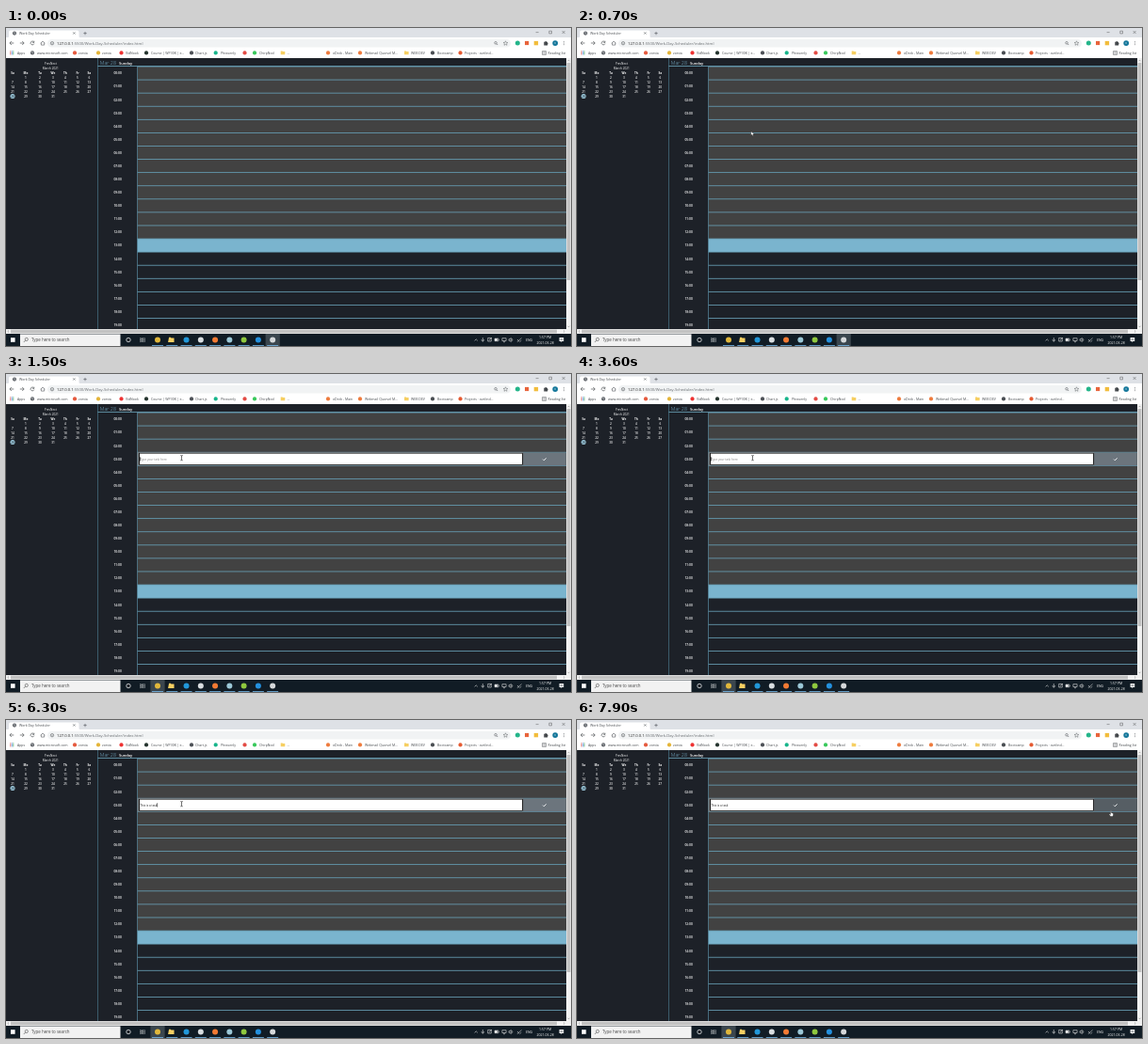
An HTML page for the animation above (8000 ms loop, 600 px wide and 338 px high).

```html
<!DOCTYPE html>
<html lang="en">
<head>
<meta charset="utf-8">
<title>Work Day Scheduler</title>
<style>
html, body { margin: 0; width: 100%; height: 100%; overflow: hidden; background: #1d2128; }
svg { display: block; width: 600px; height: 338px; }
text { font-family: "Open Sans", "Noto Sans", sans-serif; white-space: pre; }
</style>
</head>
<body>
<svg id="stage" viewBox="0 0 600 338"></svg>
<script>
const LOOP = 8000, ROW = 14.08, TOP = 41;
const BLUE = '#7ab4ce', LINE = '#6ba4bb', DARK = '#1d2128', INK = '#45494d';

const rect = (x, y, w, h, fill, extra = '') =>
  `<rect x="${x}" y="${y}" width="${w}" height="${h}" fill="${fill}" ${extra}/>`;
const dot = (x, y, r, fill, extra = '') =>
  `<circle cx="${x}" cy="${y}" r="${r}" fill="${fill}" ${extra}/>`;
const path = (d, stroke, width = 0.6, fill = 'none', extra = '') =>
  `<path d="${d}" stroke="${stroke}" stroke-width="${width}" fill="${fill}" ${extra}/>`;
const text = (x, y, str, size, fill, extra = '') =>
  `<text x="${x}" y="${y}" font-size="${size}" fill="${fill}" ${extra}>${str}</text>`;
const mid = (x, y, str, size, fill, extra = '') =>
  text(x, y, str, size, fill, `text-anchor="middle" ${extra}`);
const globe = (x, y) => dot(x, y, 2.1, '#5a5e63') +
  path(`M${x - 1.5} ${y - 0.6}h1.5l0.5 1.6M${x + 0.5} ${y - 1.3}l1 0.9`, '#dfe2e5', 0.5);
const folder = (x, y, s = 1) =>
  path(`M${x - 2.3 * s} ${y - 1.9 * s}h1.8l0.6 0.6h${2.2 * s}v${3.2 * s}h${-4.6 * s}z`, 'none', 0, '#f6cf62');

function browser() {
  let s = rect(0, 0, 600, 11, '#dee1e6') + rect(0, 10, 600, 22, '#fff') +
    path('M1.5 11Q3 10.5 3 8.5V4.5Q3 2.5 5 2.5H75.5Q77.5 2.5 77.5 4.5V8.5Q77.5 10.5 79 11z', 'none', 0, '#fff') +
    globe(9, 5.6) + text(14, 6.9, 'Work Day Scheduler', 3.5, INK) +
    path('M71.2 4.4l2.2 2.2m0 -2.2l-2.2 2.2M84 3.9v3.4m-1.7 -1.7h3.4', INK, 0.55) +
    path('M562.6 4.6h3M576.8 3.2h2.7v2.7h-2.7zM590.6 3l3 3m0 -3l-3 3', '#333', 0.4);

  s += path('M8.3 16h-4.3m1.9 -2l-2 2l2 2', INK, 0.65) +
    path('M14.8 16h4.3m-1.9 -2l2 2l-2 2', INK, 0.65) +
    path('M29.5 14.8a1.9 1.9 0 1 0 .3 1.8M29.8 13.7v1.7h-1.7', INK, 0.65) +
    path('M36.7 16.2l2.3 -2.1l2.3 2.1M37.4 15.8v2.3h3.2v-2.3', INK, 0.55) +
    rect(44, 11.9, 492, 8.6, '#f1f3f4', 'rx="4.3"') +
    dot(49, 16.2, 1.7, 'none', `stroke="${INK}" stroke-width=".5"`) +
    path('M49 15.1v.5m0 .4v1.4', INK, 0.5) +
    text(54, 17.8, '127.0.0.1<tspan fill="#666a6e">:5500/Work-Day-Scheduler/index.html</tspan>', 4.17, '#222') +
    dot(520, 15.8, 1.3, 'none', `stroke="${INK}" stroke-width=".5"`) + path('M521 16.8l1.2 1.2', INK) +
    path('M530.5 13.8l.7 1.6 1.7.1-1.3 1.1.4 1.7-1.5-.9-1.5.9.4-1.7-1.3-1.1 1.7-.1z', INK, 0.4) +
    dot(543.3, 16, 2.5, '#24b58a') + rect(551, 13.9, 4.2, 4.2, '#e8643c') +
    rect(560.7, 13.9, 4.4, 4.4, '#f2bd3d') +
    path('M571.3 14.8h1.1a.8 .8 0 0 1 1.6 0h1.1v1.2a.8 .8 0 0 1 0 1.5v1.1h-3.8z', 'none', 0, '#44484c') +
    dot(583.2, 16.1, 2.9, '#16789b') + mid(583.2, 17.3, 'v', 3.3, '#fff') +
    [14.3, 16, 17.7].map(y => dot(592.6, y, 0.45, INK)).join('');

  // Bookmarks: icon x, icon colour, label x, label
  const marks = [
    [73, '#e5593d', 77, 'zorvia'], [98, '#e4b437', 102, 'zorvia'], [122.5, '#e33', 127, 'VidNook'],
    [149, '#24332d', 154, 'Course | WP30K | e...'], [197, '#4c5056', 201, 'Chart.js'],
    [222.7, '#19b58b', 228, 'Phrasenly'], [253.5, '#e34c45', 0, ''], [264, '#37c85a', 269, 'ChirpNod'],
    [342, '#ee7b3d', 347, 'oDeck - Main'], [376, '#ee7b3d', 381, 'Webmail Quorvel M...'],
    [453, '#494d52', 458, 'Bootcamp'], [482.5, '#e55b32', 487, 'Projects · ovelind...']
  ];
  for (const [ix, color, x, label] of marks)
    s += dot(ix, 26.4, 2.1, color) + text(x, 27.7, label, 3.5, INK);
  for (let i = 0; i < 9; i++)
    s += rect(4.3 + i % 3 * 1.5, 24.4 + (i / 3 | 0) * 1.5, 1, 1, ['#db4a3f', '#4c8bea', '#42a564'][i % 3]);
  return s + text(12, 27.7, 'Apps', 3.5, INK) + globe(28, 26.4) + text(33, 27.7, 'www.microsoft.com', 3.5, INK) +
    folder(294, 26.4) + text(298.5, 27.7, '...', 3.5, INK) +
    folder(425.3, 26.4) + text(430, 27.7, 'WEB DEV', 3.5, INK) +
    path('M569.5 24.6h4v3.8h-4zM570.5 25.8h2m-2 1.3h2', INK, 0.5) + text(575.6, 27.7, 'Reading list', 3.5, INK);
}

function calendar() {
  const cols = [7, 21, 36, 50, 63, 76, 88.3];
  let s = mid(47.3, 39.2, 'PrevNext', 3.1, '#eee') + mid(47.3, 44, 'March 2021', 3.1, '#fff');
  'Su Mo Tu We Th Fr Sa'.split(' ').forEach((d, i) => s += mid(cols[i], 49, d, 3.1, '#fff', 'font-weight="700"'));
  s += dot(7, 72.4, 2.5, '#a5d4e8');
  for (let d = 1; d <= 31; d++)
    s += mid(cols[d % 7], 53.6 + (d / 7 | 0) * 5, d, 3.1, d == 28 ? '#26333c' : '#f0f0f0', 'font-weight="600"');
  return s;
}

function page() {
  let s = rect(0, 32, 600, 288, DARK) + calendar() +
    text(99.8, 38.6, 'Mar 28', 5.4, BLUE, 'font-weight="300"') +
    text(120, 38.6, 'Sunday', 4, '#fff', 'font-weight="600"');
  for (let h = 0; h < 20; h++) {
    const y = TOP + h * ROW;
    s += rect(139.5, y, 455.5, ROW, h < 13 ? '#424242' : h == 13 ? BLUE : DARK) +
      rect(139.5, y - 0.4, 455.5, 0.8, LINE) +
      mid(118.6, y + 8.4, String(h).padStart(2, 0) + ':00', 3.3, '#fff', 'font-weight="600"');
  }
  return s + rect(97, 40.2, 498, 0.8, LINE) + rect(97, 32, 0.7, 288, '#4b7689') + rect(139, TOP, 0.7, 279, '#5b8da3') +
    rect(595, 32, 5, 293, '#f1f1f1') + rect(595.6, 37, 3.8, 231, '#c1c1c1') +
    rect(0, 320, 600, 5, '#f1f1f1') + rect(5, 320.6, 580, 3.8, '#c1c1c1') +
    path('M596.4 35.3l1.1 -1.2l1.1 1.2M596.4 316.7l1.1 1.2l1.1 -1.2M3 321.4l-1.2 1.1l1.2 1.1M592 321.4l1.2 1.1l-1.2 1.1', '#777', 0.5);
}

function taskbar() {
  const apps = ['#e0b73b', '#f4cd63', '#2197d8', '#d8dde0', '#f27a33', '#9bc7d6', '#8fc83e', '#2490dd', '#d5d8da'];
  let s = rect(0, 325, 600, 13, '#111c25') + rect(5, 329.2, 4.6, 4.6, '#fff') +
    rect(15, 325.4, 106.5, 12.6, '#f2f2f2') +
    dot(21.8, 330.9, 1.6, 'none', 'stroke="#333" stroke-width=".5"') + path('M20.6 332.1l-1.7 1.8', '#333') +
    text(27, 333.2, 'Type here to search', 4.45, '#484848') +
    dot(130, 331.5, 2.2, 'none', 'stroke="#fff" stroke-width=".7"') +
    path('M142.6 329.3v.7h3.4v-.7M142.6 333.9v-.7h3.4v.7M142.6 330.9h3.4v1.3h-3.4zM147.3 329.3v4.6', '#e6e8ea', 0.5) +
    rect(153.4, 325, 15.2, 13, '#3b464e', 'id="chromeOn"') + rect(275.6, 325, 15.2, 13, '#3b464e', 'id="recOn"');
  apps.forEach((c, i) => {
    const x = 161 + i * 15.27;
    s += (i == 1 ? folder(x, 331.5, 1.4) : dot(x, 331.5, 3, c)) +
      rect(x - 6, 337.2, 12, 0.8, '#76b9ed');
  });
  const tray = 'M497.6 332.4l1.6 -1.6l1.6 1.6M506.3 329v2.8m-1.2 -.6v1h2.4v-1m-1.2 1v1.5' +
    'M511.7 329.4h3.6v3.6h-3.6zM512.8 331.9l3.2 -2.8M519 330.1h4v2.6h-4zM523.2 331v.8' +
    'M526.9 329.7h4.2v2.8h-4.2zM528 333.7h2M534 330.7h1l1.3 -1.2v4l-1.3 -1.2h-1zM537.3 330.2q1 1.3 0 2.6' +
    'M543 333.8l4.4 -4.4M543 331l2 2.3M545.6 333.6l1.7 -1.6';
  return s + path(tray, '#f0f0f0', 0.55) + rect(519, 330.1, 2.8, 2.6, '#f0f0f0') +
    text(552, 332.9, 'ENG', 3.5, '#fff') +
    mid(572.6, 329.9, '1:57 PM', 3.5, '#fff') + mid(572.6, 336, '2021-03-28', 3.5, '#fff') +
    path('M587.6 329h4.6v4h-1.8l-1 1.2v-1.2h-1.8z', 'none', 0, '#fff') +
    path('M588.5 330.4h2.8m-2.8 1.2h2.8', '#111c25', 0.4);
}

const form = `<g id="form">${
  rect(139.5, 83.2, 410, 14.2, '#777b7e') + rect(141, 84, 407.8, 12.6, '#1b1b1b') + rect(142, 84.6, 406, 11.4, '#fff') +
  rect(549.4, 83.6, 45.4, 13.6, '#6c757d', 'id="save"') + path('M570.1 90.6l1.2 1.2l2.3 -2.4', '#fff', 0.9) +
  text(142.3, 91.6, '', 3.1, '#333', 'id="entry"') + rect(0, 88.3, 0.6, 4.2, '#111', 'id="caret"')}</g>`;

const pointers =
  path('M0 0v4.6l1.1 -1l.8 1.7l.8 -.4l-.8 -1.6h1.5z', '#111', 0.35, '#fff', 'id="arrow"') +
  path('M-1.2 -2.6h.9l.3 .3l.3 -.3h.9M0 -2.3v4.6M-1.2 2.6h.9l.3 -.3l.3 .3h.9', '#111', 0.6, 'none', 'id="beam"') +
  path('M-.5 0q.5 -.7 1 0v2l2 .5v1.8l-.6 1.5h-2.3l-1.7 -2.4q.2 -.8 1 -.2l.6 .5z', '#111', 0.35, '#fff', 'id="hand"');

stage.innerHTML = browser() + page() + form + taskbar() + pointers;
const el = id => document.getElementById(id);
const show = (id, on) => el(id).setAttribute('display', on ? 'inline' : 'none');

// Time, number of characters typed by then
const PHRASE = 'This is a task';
const KEYS = [[3900, 1], [4300, 2], [4400, 3], [4500, 4], [4700, 5], [4900, 6], [5000, 7],
  [5200, 9], [5700, 10], [6100, 11], [6200, 13], [6300, 14]];
const CARET_FLIPS = [2000, 2500, 3100, 3600, 6800, 7300, 7800];
// Pointer: time, x, y
const MOVES = [[100, 262, 322], [300, 228, 225], [500, 194, 135], [700, 184.8, 109.7], [900, 185, 105],
  [1000, 185.2, 101], [1400, 186, 89.3], [1500, 186.5, 89.2], [6900, 186.5, 89.2], [7000, 188.5, 88.2],
  [7100, 188.5, 88.2], [7300, 260, 84], [7500, 420, 83], [7700, 540, 91], [7900, 567, 96.7]];

function pointerAt(t) {
  const i = MOVES.findIndex(m => m[0] > t);
  if (i < 0) return MOVES[MOVES.length - 1].slice(1);
  if (!i) return [MOVES[0][1], MOVES[0][2]];
  const [a, b] = [MOVES[i - 1], MOVES[i]];
  const k = (t - a[0]) / (b[0] - a[0]);
  return [1, 2].map(n => a[n] + (b[n] - a[n]) * k);
}

function draw(now) {
  const t = Math.floor(now % LOOP / 100) * 100;
  const open = t >= 1500;
  const typed = KEYS.reduce((n, [at, count]) => t >= at ? count : n, 0);
  const [x, y] = pointerAt(t);
  const onButton = open && x > 549.4;
  show('form', open);
  show('chromeOn', open);
  show('recOn', !open);

  const entry = el('entry');
  entry.textContent = typed ? PHRASE.slice(0, typed) : 'Type your task here';
  entry.setAttribute('fill', typed ? '#222' : '#858585');
  const width = typed && open ? entry.getComputedTextLength() : -0.3;
  el('caret').setAttribute('x', 142.3 + width);
  show('caret', CARET_FLIPS.filter(f => t >= f).length % 2 == 0);
  el('save').setAttribute('fill', onButton ? '#565e64' : '#6c757d');

  const shape = !open ? 'arrow' : onButton ? 'hand' : x < 548 ? 'beam' : 'arrow';
  for (const id of ['arrow', 'beam', 'hand']) {
    show(id, t >= 100 && id == shape);
    el(id).setAttribute('transform', `translate(${x} ${y})`);
  }
}

const start = performance.now();
function tick() {
  draw(performance.now() - start);
  requestAnimationFrame(tick);
}
tick();
</script>
</body>
</html>
```
